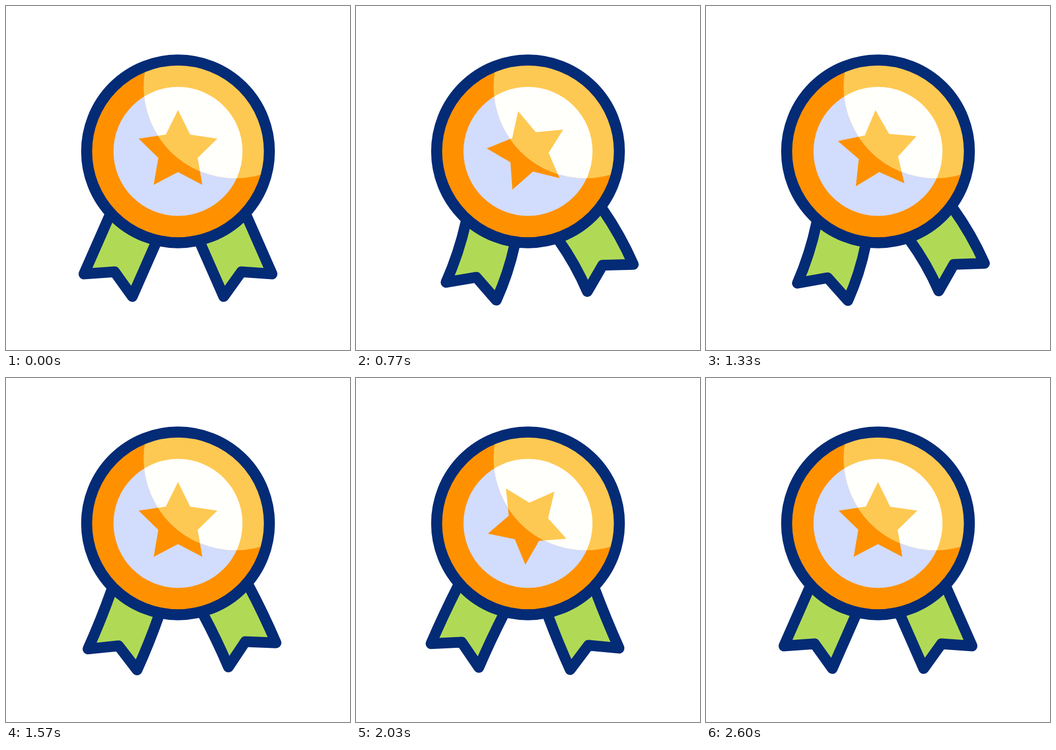
Write an HTML page with a canvas that moves like this. It is 640 px wide and 640 px high and loops after 2.77 s.

```html
<!DOCTYPE html>
<html lang="en">
<head>
<meta charset="utf-8">
<title>Award rosette</title>
<style>
  html, body { margin: 0; width: 100%; height: 100%; overflow: hidden; background: #fff; }
  canvas { display: block; }
</style>
</head>
<body>
<canvas id="stage" width="640" height="640"></canvas>
<script>
const ctx = document.getElementById('stage').getContext('2d');
const LOOP = 2770;
const NAVY = '#042b76', GREEN = '#b0da55';
const SHADE = { ring: '#ff9100', face: '#d2dcfd' };
const LIGHT = { ring: '#fec952', face: '#fffffc' };

// [tick, degrees], 30 ticks per second
const SWING = [[0, 0], [13.6, -20.5], [17.3, -20.5], [30, 15], [41.6, -7.2],
               [54, 6], [65, -0.6], [78, 0]];
const SPIN = [[0, 0], [42.5, 360], [51.5, 360], [78.2, 0]];

function valueAt(keys, tick) {
  for (let i = 1; i < keys.length; i++) {
    const [t0, a] = keys[i - 1], [t1, b] = keys[i];
    if (tick < t1) {
      const x = (tick - t0) / (t1 - t0);
      return a + (b - a) * x * x * (3 - 2 * x);
    }
  }
  return keys[keys.length - 1][1];
}

function disc(x, y, r) {
  ctx.beginPath();
  ctx.arc(x, y, r, 0, 2 * Math.PI);
}

// Coordinates are relative to the medal centre; bow pushes the edges along +x.
function ribbon(side, bow) {
  const push = 2 * bow * side;
  const bend = (x0, y0, x1, y1) =>
    ctx.quadraticCurveTo((x0 + x1) / 2 + 0.91 * push, (y0 + y1) / 2 - 0.41 * push, x1, y1);
  ctx.save();
  ctx.scale(side, 1);
  ctx.beginPath();
  ctx.moveTo(118, 99);
  ctx.lineTo(127.5, 120);
  bend(127.5, 120, 175, 228);
  ctx.lineTo(118, 224);
  ctx.lineTo(85, 270);
  bend(85, 270, 41, 170);
  ctx.lineTo(32, 149);
  ctx.fillStyle = GREEN;
  ctx.fill();
  ctx.strokeStyle = NAVY;
  ctx.lineWidth = 20;
  ctx.lineJoin = 'round';
  ctx.stroke();
  ctx.restore();
}

function star(spin) {
  ctx.beginPath();
  for (let i = 0; i < 10; i++) {
    const r = i % 2 ? 38.5 : 77;
    const a = (spin + i * 36 - 90) * Math.PI / 180;
    ctx.lineTo(r * Math.cos(a), r * Math.sin(a));
  }
  ctx.closePath();
}

function medal(colors, spin) {
  disc(0, 0, 165);
  ctx.fillStyle = colors.ring;
  ctx.fill();
  disc(0, 0, 120);
  ctx.fillStyle = colors.face;
  ctx.fill();
  star(spin);
  ctx.fillStyle = colors.ring;
  ctx.fill();
}

function draw(tick) {
  const swing = valueAt(SWING, tick), spin = valueAt(SPIN, tick);
  ctx.fillStyle = '#fff';
  ctx.fillRect(0, 0, 640, 640);
  ctx.save();
  ctx.translate(320, 270.5);

  ctx.save();
  ctx.rotate(swing * Math.PI / 180);
  const bow = -4 * Math.tanh(swing / 6);
  ribbon(-1, bow);
  ribbon(1, bow);
  ctx.restore();

  medal(SHADE, spin);
  ctx.save();
  disc(107, -121, 171);
  ctx.clip();
  medal(LIGHT, spin);
  ctx.restore();

  disc(0, 0, 170);
  ctx.strokeStyle = NAVY;
  ctx.lineWidth = 20.5;
  ctx.stroke();
  ctx.restore();
}

const start = performance.now();
function loop() {
  const time = (performance.now() - start) % LOOP;
  draw(Math.floor((time + 5) * 0.03));
  requestAnimationFrame(loop);
}
loop();
</script>
</body>
</html>
```
